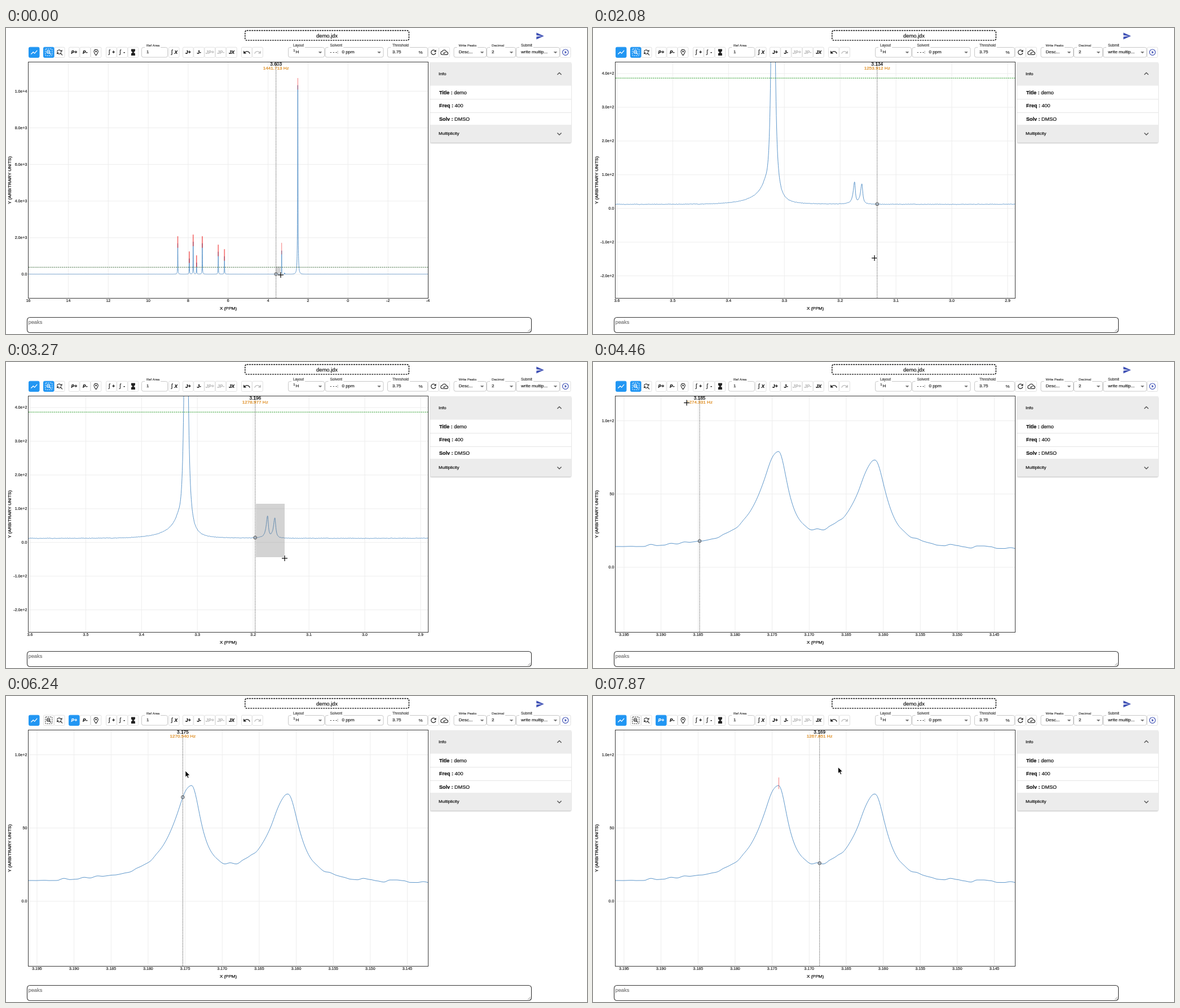
Animation, 1030 px wide and 544 px high, one loop 8000 ms. Source, as an HTML page with a canvas:

```html
<!DOCTYPE html>
<html lang="en">
<head>
<meta charset="utf-8">
<title>Spectrum editor</title>
<style>
html, body { margin: 0; width: 100%; height: 100%; overflow: hidden; background: #fff; }
canvas { display: block; }
</style>
</head>
<body>
<canvas id="stage" width="1030" height="544"></canvas>
<script>
const g = document.getElementById('stage').getContext('2d');
const SANS = '"Liberation Sans", Arial, sans-serif';
const LOOP = 8000, STEP = 148.5, PI = Math.PI;
const BLUE = '#2196f3', INDIGO = '#3f51b5', INK = '#222';
const ZOOM_1 = 9, DRAG_2 = 18, ZOOM_2 = 25, CLICK_TOOL = 36, CLICK_PEAK = 50, LAST = 53;

// ---------- drawing helpers ----------
function paint(fill, stroke, lw = 1) {
  if (fill) { g.fillStyle = fill; g.fill(); }
  if (stroke) { g.strokeStyle = stroke; g.lineWidth = lw; g.stroke(); }
}
function text(s, x, y, size, color = '#111', align = 'left', style = '') {
  g.font = `${style} ${size}px ${SANS}`;
  g.textAlign = align;
  g.textBaseline = 'middle';
  g.fillStyle = g.strokeStyle = color;
  g.lineWidth = 0.2;
  g.fillText(s, x, y);
  g.strokeText(s, x, y);
}
function box(x, y, w, h, r, fill, stroke, lw) {
  g.beginPath();
  g.roundRect(x, y, w, h, r);
  paint(fill, stroke, lw);
}
function line(x1, y1, x2, y2, color, lw = 1, dash = []) {
  g.beginPath();
  g.moveTo(x1, y1);
  g.lineTo(x2, y2);
  g.setLineDash(dash);
  paint(null, color, lw);
  g.setLineDash([]);
}
function arc(x, y, r, from, to, color, lw, fill) {
  g.beginPath();
  g.arc(x, y, r, from, to);
  paint(fill, color, lw);
}
// offsets are x, y pairs around a centre
function poly(x, y, offsets, fill, stroke, lw) {
  g.beginPath();
  for (let i = 0; i < offsets.length; i += 2) g.lineTo(x + offsets[i], y + offsets[i + 1]);
  if (fill) g.closePath();
  paint(fill, stroke, lw);
}

// ---------- icons ----------
const chevron = (x, y, dir) => poly(x, y, [-3.6, -1.8 * dir, 0, 1.8 * dir, 3.6, -1.8 * dir], null, '#555', 1.4);
const dropArrow = (x, y) => poly(x, y, [-3.3, -1.4, 3.3, -1.4, 0, 1.9], '#757575');
const chartIcon = (x, y) => poly(x, y, [-5.4, 3.3, -1.5, -0.5, 0.9, 1.9, 5.4, -3.4], null, '#fff', 1.3);
const sendIcon = (x, y) => poly(x, y, [-6.7, 6, 6.7, 0, -6.7, -6, -6.7, -1.3, 3.3, 0, -6.7, 1.3], INDIGO);
function hourglass(x, y) {
  poly(x, y, [-3.5, -5.8, 3.5, -5.8, 3.5, -2.3, 1.2, 0, -1.2, 0, -3.5, -2.3], INK);
  poly(x, y, [-3.5, 5.8, 3.5, 5.8, 3.5, 2.3, 1.2, 0, -1.2, 0, -3.5, 2.3], INK);
}
const turnBack = (color, dir) => (x, y) => {
  g.save();
  g.translate(x, y);
  g.scale(dir, 1);
  arc(0.4, 3.3, 4.9, PI * 1.2, PI * 1.95, color, 1.4);
  poly(0, 0, [-5.8, -2.9, -5.8, 2.3, -0.6, 2.3], color);
  g.restore();
};
function refresh(x, y) {
  arc(x, y, 4.1, 0.26, PI * 1.75, INK, 1.2);
  poly(x, y, [4.7, -4.7, 4.7, -0.6, 0.6, -0.6], INK);
}
function findReset(x, y) {
  arc(x - 0.6, y - 0.6, 3.6, PI * 1.05, PI * 1.8, INK, 1.2);
  arc(x - 0.6, y - 0.6, 3.6, PI * 0.05, PI * 0.8, INK, 1.2);
  poly(x, y, [4.7, -4.7, 4.7, -1.2, 1.2, -1.2], INK);
  poly(x, y, [-4.7, 3.5, -4.7, 0, -1.2, 0], INK);
  line(x + 2, y + 2, x + 5.2, y + 5.2, INK, 1.2);
}
function cloud(x, y) {
  g.beginPath();
  g.arc(x - 3.5, y + 1.2, 2.9, PI * 0.5, PI * 1.4);
  g.arc(x, y - 0.5, 3.7, PI * 1.15, PI * 1.88);
  g.arc(x + 4, y + 1.8, 2.4, -PI / 2, PI / 2);
  g.closePath();
  paint(null, INK, 1.1);
  poly(x, y, [-2, 1, -0.7, 2.2, 2.2, -0.8], null, INK, 1.1);
}
function play(x, y) {
  arc(x, y, 5.2, 0, 7, INDIGO, 1.2);
  poly(x, y, [-1.2, -2.6, -1.2, 2.6, 2.3, 0], INDIGO);
}
function pin(x, y) {
  g.beginPath();
  g.arc(x, y - 1.4, 3.6, PI * 0.9, PI * 2.1);
  g.quadraticCurveTo(x + 2.6, y + 2.4, x, y + 5.4);
  g.quadraticCurveTo(x - 2.6, y + 2.4, x - 3.5, y - 0.4);
  paint(null, INK, 1.1);
  arc(x, y - 1.4, 1.4, 0, 7, null, 1, INK);
}
const zoomIcon = color => (x, y) => {
  g.setLineDash([2.2, 1.4]);
  box(x - 6, y - 6, 12, 12, 1, null, color);
  g.setLineDash([]);
  arc(x - 0.7, y - 0.7, 2.7, 0, 7, color, 1.1);
  line(x + 1.2, y + 1.2, x + 3.8, y + 3.8, color, 1.3);
  line(x - 2, y - 0.7, x + 0.6, y - 0.7, color, 0.8);
  line(x - 0.7, y - 2, x - 0.7, y + 0.6, color, 0.8);
};
const label = (s, color = '#111') => (x, y) => text(s, x, y + 0.3, 8.4, color, 'center', 'italic bold');
const integral = s => (x, y) => {
  text('∫', x - 3.7, y, 10, '#111', 'center', 'italic');
  label(s)(x + 3.6, y);
};

// ---------- spectrum: ppm, height, left width, right width ----------
const ARYL = [[8.521, 1680], [7.942, 850], [7.75, 1770], [7.58, 636], [7.293, 1680], [6.494, 1220], [6.184, 974]];
const MARKED = [...ARYL.map(([p, h]) => [p, h, 0.008, 0.008]),
  [3.3202, 1321, 0.00287, 0.00287], [2.513, 10320, 0.012, 0.012]];
const SPLIT = [[3.17417, 63.7, 0.0029, 0.0016], [3.16111, 60.3, 0.003, 0.0019]];
const LINES = [...MARKED, ...SPLIT];

function rand(i) {
  const v = Math.sin(i * 127.1 + 11.7) * 43758.5453;
  return v - Math.floor(v) - 0.5;
}
function noise(p) {
  const c = p / 0.0009, i = Math.floor(c), u = c - i, s = u * u * (3 - 2 * u);
  return 1.8 * (rand(i) * (1 - s) + rand(i + 1) * s);
}
function spectrum(p) {
  let v = 12.3 + noise(p);
  for (const [c, h, wl, wr] of LINES) {
    const d = p - c, w = d > 0 ? wl : wr;
    v += h * Math.exp(-((d / 0.2) ** 2)) / (1 + (d / w) ** 2);
  }
  const d = p - 3.3316;
  return v + 40 * Math.exp(-d / 0.028) / (1 + Math.exp(-d / 0.002));
}

// ---------- views: ppm p0 sits at px, value 0 at y0 ----------
class View {
  constructor(px, p0, kx, y0, ky, ticks, dx) { Object.assign(this, { px, p0, kx, y0, ky, ticks, dx }); }
  x(p) { return this.px + (this.p0 - p) * this.kx; }
  ppm(x) { return this.p0 - (x - this.px) / this.kx; }
  y(v) { return this.y0 - v * this.ky; }
  curve(x) { return this.y(spectrum(this.ppm(x))); }
}
const VIEWS = [
  new View(39.6, 16, 35.42, 437.9, 0.03255, { dp: 2, np: 11, digits: 0, v0: 0, dv: 2000, nv: 6 }, 0.1),
  new View(42.5, 3.6, 989.3, 320.8, 0.5995, { dp: 0.1, np: 8, digits: 1, v0: -200, dv: 100, nv: 7 }, 0.5),
  new View(55, 3.195, 13130, 365, 2.605, { dp: 0.005, np: 11, digits: 3, v0: 0, dv: 50, nv: 3 }, 2)
];
const valueLabel = v => !v ? '0.0' : Math.abs(v) < 100 ? String(v) : v.toExponential(1);

// ---------- page chrome ----------
function button(x, draw, fill) {
  box(x + 0.5, 34.2, 18.5, 18.2, 2, fill || '#fff', fill || '#e0e0e0');
  draw(x + 9.8, 43.2);
}
const buttonRow = (x, ...draws) => draws.forEach((d, i) => button(x + i * 19.3, d));
function field(x, w, name, value, labelSize = 6.2, arrow = true) {
  box(x + 0.5, 34.5, w - 1, 17.5, 3, '#fff', '#c8c8c8');
  g.font = `${labelSize}px ${SANS}`;
  g.fillStyle = '#fff';
  g.fillRect(x + 6, 33, g.measureText(name).width + 5, 3);
  text(name, x + 9, 31.2, labelSize, '#444');
  text(value, x + 9, 43, 8, INK);
  if (arrow) dropArrow(x + w - 8, 43.4);
}
function toolbar(n) {
  const zoomOn = n < CLICK_TOOL;
  const ripple = n > CLICK_TOOL && n < CLICK_TOOL + 3;
  const hover = n >= CLICK_TOOL - 3 ? '#f0f0f0' : null;
  button(40, chartIcon, BLUE);
  button(85, findReset);
  button(66, zoomIcon(zoomOn ? '#fff' : INK), zoomOn ? BLUE : null);
  buttonRow(130.5, label('P-'), pin);
  button(111, label('P+', zoomOn ? '#111' : '#fff'), zoomOn ? hover : ripple ? '#5bc0f8' : BLUE);
  buttonRow(177, integral('+'), integral('-'), hourglass);
  field(240, 47, 'Ref Area', '1', 5.9, false);
  button(288, integral('X'));
  buttonRow(313, label('J+'), label('J-'), label('JP+', '#bdbdbd'), label('JP-', '#bdbdbd'), label('JX'));
  buttonRow(417, turnBack(INK, 1), turnBack('#bdbdbd', -1));
  field(500, 65, 'Layout', '', 6.3);
  text('1', 509.3, 40, 6, INK);
  text('H', 513.5, 43, 8, INK);
  field(565.5, 104, 'Solvent', '- - -:', 6.5);
  text('0 ppm', 595.5, 43, 8, INK);
  field(676, 72, 'Threshold', '3.75', 6.5, false);
  text('%', 735, 43.3, 8, '#444', 'center');
  buttonRow(748, refresh, cloud);
  field(793.5, 58.5, 'Write Peaks', 'Desc...', 5.9);
  field(852, 52, 'Decimal', '2', 6.1);
  field(904, 78, 'Submit', 'write multip...', 6.4);
  button(982, play);
}
function sidePanel() {
  g.save();
  g.shadowColor = 'rgba(0,0,0,.35)';
  g.shadowBlur = 2;
  g.shadowOffsetY = 1;
  box(752, 61, 250, 142.5, 2, '#fff');
  g.restore();
  g.fillStyle = '#ececec';
  g.fillRect(752, 61, 250, 41.5);
  g.fillRect(752, 172, 250, 31.5);
  text('Info', 767, 81.5, 8);
  text('Multiplicity', 767, 188.2, 7.9);
  chevron(981, 81.2, -1);
  chevron(981, 188.2, 1);
  [['Title : ', 'demo'], ['Freq : ', '400'], ['Solv : ', 'DMSO']].forEach(([key, value], i) => {
    const y = 115.2 + i * 23.6;
    text(key, 768, y, 9, '#111', 'left', 'bold');
    text(value, 768 + g.measureText(key).width, y, 9);
    if (i < 2) line(752, y + 11.5, 1002, y + 11.5, '#e4e4e4');
  });
}
function chrome(n) {
  g.setLineDash([2.8, 1.5]);
  box(423.8, 4.5, 290.6, 17.4, 3, '#fff', '#000', 1.4);
  g.setLineDash([]);
  text('demo.jdx', 569, 14.8, 9.4, '#111', 'center');
  sendIcon(947, 14.3);
  toolbar(n);
  sidePanel();
  box(37.5, 514.5, 894, 27, 5, '#fff', '#333', 1.1);
  text('peaks', 39.5, 523, 9.3, '#757575');
  line(925, 540, 930, 535, '#777', 0.8);
  line(928, 540, 930, 538, '#777', 0.8);
}

// ---------- chart ----------
function axes(v) {
  const t = v.ticks;
  for (let i = 0; i < t.np; i++) {
    const p = v.p0 - t.dp * i, x = v.x(p);
    if (x > 41) line(x, 61, x, 480, '#ededed');
    text(p.toFixed(t.digits), x, 485.2, 7, INK, 'center');
  }
  for (let i = 0; i < t.nv; i++) {
    const val = t.v0 + t.dv * i, y = v.y(val);
    line(40, y, 748, y, '#ededed');
    text(valueLabel(val), 37.3, y + 0.2, 7, INK, 'right');
  }
  text('X (PPM)', 394, 498.3, 8, '#000', 'center');
  g.save();
  g.translate(6.3, 270.5);
  g.rotate(-PI / 2);
  text('Y (ARBITRARY UNITS)', 0, 0, 8, '#000', 'center');
  g.restore();
}
const peakMark = (x, y) => line(x, y - 13, x, y + 7.5, 'rgba(240,30,30,.65)', 0.9);

function chart(v, n) {
  axes(v);
  g.save();
  g.beginPath();
  g.rect(40, 61, 708.5, 419);
  g.clip();
  g.beginPath();
  g.lineJoin = 'round';
  for (let x = 40; x <= 750; x += v.dx) g.lineTo(x, v.curve(x));
  paint(null, '#4b8bc4', 0.9);
  const limit = v.y(386.5);
  line(40, limit, 748, limit, n < ZOOM_1 ? '#3d6b3d' : '#1a941a', 1, [2.1, 1.38]);
  if (n < ZOOM_1) {
    for (const [p, h] of MARKED) {
      const x = v.x(p), y = v.y(h);
      if (p > 6) { peakMark(x - 0.35, y); peakMark(x + 0.35, y); }
      else peakMark(x, y);
    }
  }
  if (n >= CLICK_PEAK) peakMark(329.4, 157.8);
  g.restore();
  g.strokeStyle = '#3a3a3a';
  g.lineWidth = 1;
  g.strokeRect(39.5, 60.5, 709, 420);
}

// crosshair sits on the nearest sample
function crosshair(v, x) {
  const MHZ = 400.13, BASE = 1274.3307, GAP = 0.122266;
  const hz = BASE + Math.round((v.ppm(x) * MHZ - BASE) / GAP) * GAP;
  const ppm = hz / MHZ, lx = v.x(ppm);
  line(lx, 61, lx, 480, '#333', 0.9, [1.4, 1.4]);
  arc(lx, v.curve(lx), 2.8, 0, 7, '#444', 0.9, 'rgba(150,165,180,.45)');
  text(ppm.toFixed(3), lx, 64.8, 8.3, '#000', 'center');
  text(hz.toFixed(3) + ' Hz', lx, 71.8, 8.1, '#dc8410', 'center');
}

// ---------- pointer ----------
function cross(x, y) {
  for (const [c, w, r] of [['#fff', 2.6, 5.6], ['#000', 1.2, 5]]) {
    line(x - r, y, x + r, y, c, w);
    line(x, y - r, x, y + r, c, w);
  }
}
const arrow = (x, y) =>
  poly(x, y, [0, 0, 0, 11.2, 2.5, 9, 4.3, 13.1, 6.2, 12.3, 4.4, 8.3, 7.9, 8], '#000', '#fff', 0.8);

// from step, to step, target x, y, ease-out power
const MOVES = [
  [0, 6, 505, 449, 1], [13, 14, 499, 409, 0.3], [14, 18, 443, 254, 1], [18, 22, 494, 349, 1],
  [24, 25, 482, 230, 1], [27, 33, 121, 50, 3], [36, 45, 330, 138, 2.6], [50, 53, 434.5, 126.5, 0.6]
];
function pointer(n) {
  let x = 487, y = 439;
  for (const [from, to, tx, ty, power] of MOVES) {
    if (n <= from) break;
    const u = 1 - (1 - Math.min(1, (n - from) / (to - from))) ** power;
    x += (tx - x) * u;
    y += (ty - y) * u;
  }
  return [x, y];
}
// the crosshair trails the pointer; it stands still during drags and outside the chart
function crosshairX(n) {
  if (n < ZOOM_1) return 478.7;
  if (n >= DRAG_2 && n < ZOOM_2) return 441.8;
  if (n > 30 && n < 39) return 161;
  return pointer(n - 0.45)[0];
}

function draw(ms) {
  const n = Math.min(LAST, Math.floor((ms + 5) / STEP));
  const v = VIEWS[n < ZOOM_1 ? 0 : n < ZOOM_2 ? 1 : 2];
  const [x, y] = pointer(n);
  g.fillStyle = '#fff';
  g.fillRect(0, 0, 1030, 544);
  chrome(n);
  chart(v, n);
  crosshair(v, crosshairX(n));
  g.fillStyle = 'rgba(119,119,119,.32)';
  if (n < ZOOM_1) g.fillRect(478.5, 424, x - 478.5, y - 426);
  if (n > DRAG_2 && n < ZOOM_2) g.fillRect(443, 252, x - 443, y - 254);
  const tip = Math.min(0.9, (n - 31) / 3, (41 - n) / 5);
  if (tip > 0) {
    g.globalAlpha = tip;
    box(98.5, 55.5, 43.5, 11.5, 2, '#616161');
    text('Add Peak', 120.5, 61.3, 7.6, '#fff', 'center');
    g.globalAlpha = 1;
  }
  if (n < 31) cross(x, y);
  else arrow(x, y);
}
function tick(now) {
  draw(now % LOOP);
  requestAnimationFrame(tick);
}
draw(0);
requestAnimationFrame(tick);
</script>
</body>
</html>
```
